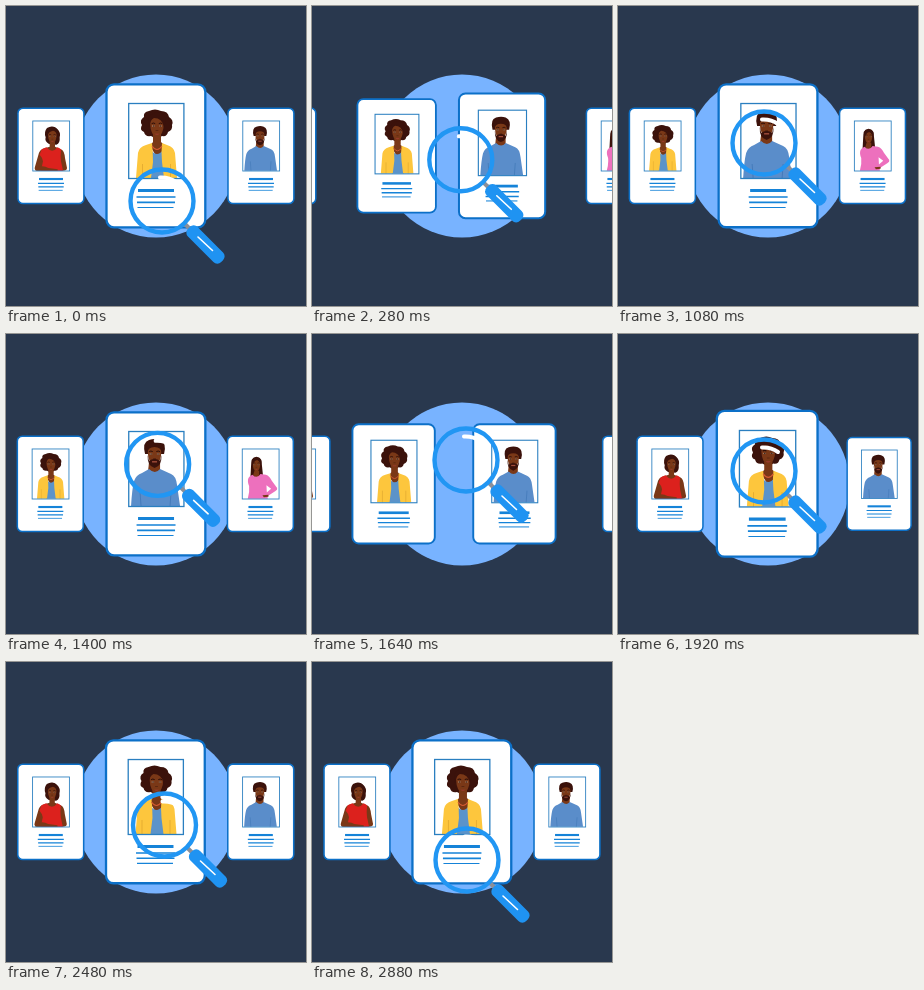
An HTML page for the animation above (2920 ms loop, 300 px wide and 300 px high).

```html
<!DOCTYPE html>
<html lang="en">
<head>
<meta charset="utf-8">
<title>Candidate search</title>
<style>
  html, body { margin: 0; width: 100%; height: 100%; overflow: hidden; background: #29384e; }
  svg { display: block; width: 100vw; height: 100vh; }
  .skin { fill: #7a3817; }
  .hair { fill: #3b120b; }
</style>
</head>
<body>
<svg viewBox="0 0 300 300">
  <defs>
    <g id="sheet">
      <rect x="-49.5" y="-71.7" width="98.8" height="143" rx="7.5" fill="#fff" stroke="#0c70c8" stroke-width="2.3"/>
      <g fill="none" stroke="#1583d8">
        <path d="M-18 34.5H18" stroke-width="3.2"/>
        <path d="M-19.5 41H19.5M-19 46.3H19" stroke-width="1.7"/>
        <path d="M-18.5 51.5H17.5" stroke-width="1.2"/>
      </g>
    </g>
    <rect id="frame" x="-27.3" y="-52.5" width="55.2" height="75" fill="none" stroke="#2a7fc0" stroke-width="1.3"/>
    <g id="face">
      <path class="skin" d="M-6.8-32Q-7-41 0-41Q7-41 6.8-32Q6.6-22 0-17Q-6.6-22-6.8-32Z"/>
      <path d="M-5.4-32.3Q-3.8-33.6-1.8-32.4M1.8-32.4Q3.8-33.6 5.4-32.3" fill="none" stroke="#2b0d08" stroke-width="1"/>
      <path d="M-4.8-30H-2.4M2.4-30H4.8" stroke="#c9b09a" stroke-width=".9"/>
      <path d="M-4-30h1.2M2.9-30h1.2" stroke="#1d0906" stroke-width="1.2"/>
      <path d="M-1.4-25.5H1.4" stroke="#54230f" stroke-width=".8"/>
      <path d="M-2.6-22.3Q0-20 2.6-22.3Z" fill="#a23a32"/>
    </g>
  </defs>

  <rect width="300" height="300" fill="#29384e"/>
  <circle cx="150" cy="150" r="81.5" fill="#78b3ff"/>

  <g id="red">
    <use href="#sheet"/>
    <path class="hair" d="M-6-42Q2-47 9-41Q15-36 13-28Q14-19 8-17L-3-18Q-10-22-8-28Q-11-36-6-42Z"/>
    <path class="skin" d="M-2-22H6V-14L15-10Q20-8 21 3L24 18Q24 22 18 22H-20Q-26 21-24 16L-18-5Q-17-9-12-11L-2-14Z"/>
    <path d="M-14-10L-7-13Q2-3 10-13L15-10Q14 0 15 8L18 22H-15L-12 8Q-13 2-17-2Z" fill="#dc211d"/>
    <path class="skin" d="M-24 18Q-12 13-4 18L10 20V22H-23Z"/>
    <use href="#face" transform="translate(2 -1) scale(.95)"/>
    <path class="hair" d="M-6-29Q-4-37 3-38Q8-37 10-30Q13-42 3-44Q-8-43-6-29Z"/>
    <use href="#frame"/>
  </g>

  <g id="yellow">
    <use href="#sheet"/>
    <path class="hair" d="M-7-45Q-1-48 5-45Q12-45 13-39Q18-36 16-31Q17-26 12-24Q11-19 6-20Q1-16-5-20Q-11-19-12-24Q-17-26-14-31Q-17-36-12-39Q-13-44-7-45Z"/>
    <path class="skin" d="M-3-22H5V-14L9-10L2 3L-6-10L-3-14Z"/>
    <path d="M-5-6Q1 2 7-6L9 22H-6Z" fill="#5b93c9"/>
    <path d="M-4-13L-10-11Q-17-9-18-3L-20 22H-5L-3 6Q-3-4-4-13Z" fill="#fdc63d"/>
    <path d="M6-13L11-11Q18-9 19-3L21 22H8L6 6Q5-4 6-13Z" fill="#fdc63d"/>
    <path d="M-13.5 8V22M14.5 8V22" stroke="#e0a82f" stroke-width=".8"/>
    <path d="M-4-10Q1-3 6-10" fill="none" stroke="#d65b32" stroke-width="1.1"/>
    <use href="#face" x="1"/>
    <path class="hair" d="M-7-29Q-6-36-2-38Q6-38 8-29Q13-42 2-44Q-11-42-7-29Z"/>
    <use href="#frame"/>
  </g>

  <g id="man">
    <use href="#sheet"/>
    <path class="skin" d="M-7-22H4V-13L-1-7L-8-13Z"/>
    <path d="M-7-15Q-1-9 4-15L15-10Q20-8 21 1L24 22H-25Q-24 5-22-3Q-20-9-14-11Z" fill="#5a8dca"/>
    <path d="M-16 8L-15 22M15 8L14 22" stroke="#4279b8" stroke-width=".9"/>
    <path class="hair" d="M-11-30Q-14-42-7-44Q-1-46 4-44Q11-41 8-30Z"/>
    <use href="#face" x="-1.5"/>
    <path class="hair" d="M-8.4-29L-7-23Q-4-25.5-1.5-25Q1-25.5 4-23L5.4-29Q6-18-1.5-16Q-9-18-8.4-29Z"/>
    <path d="M-4-22.2H1" stroke="#a14c3a" stroke-width="1.4"/>
    <path class="hair" d="M-9-31Q-8-37-1.5-37Q5-37 6-31Q10-43-1-44Q-13-43-9-31Z"/>
    <use href="#frame"/>
  </g>

  <g id="pink">
    <use href="#sheet"/>
    <path class="hair" d="M-6-40Q2-40 2-30L4-11Q-5-6-15-10L-14-29Q-13-40-6-40Z"/>
    <path class="skin" d="M-9-20H-2V-13L-5-8L-11-13Z"/>
    <path d="M-12-14Q-5-7 0-15L8-14Q14-12 17-5L25 6Q26 9 22 11L11 18L9 13L16 7L9 2Q9 12 11 22H-19Q-16 12-17 3Q-20-4-18-9Q-16-13-12-14Z" fill="#ed70bd"/>
    <path class="skin" d="M12 16L3 17L5 20L12 19Z"/>
    <use href="#face" transform="translate(-6 -2) scale(.86 .9)"/>
    <path class="hair" d="M-12-25Q-11-35-5-36Q0-34 0-25Q5-40-6-41Q-17-40-12-25Z"/>
    <use href="#frame"/>
  </g>

  <g id="lens" fill="none">
    <path d="M22 22L31 31" stroke="#8b8f99" stroke-width="4"/>
    <circle r="31.5" stroke="#2196f3" stroke-width="4.4"/>
    <path d="M-2-23.5Q7-24 14-19" stroke="#fff" stroke-width="4" stroke-linecap="round"/>
    <rect x="38" y="-6.8" width="47" height="13.6" rx="5.5" transform="rotate(45)" fill="#1f93f2"/>
    <path d="M36 36L50.5 49.5" stroke="#fff" stroke-width="1.6" stroke-linecap="round"/>
  </g>
</svg>

<script>
const LOOP = 2920, STEP = 40, SIDE = 0.667;
const byId = id => document.getElementById(id);
const lerp = (a, b, p) => a + (b - a) * p;

// Linear move from 0 to 1, followed by a decaying wobble.
function spring(t, start, end) {
  if (t <= start) return 0;
  if (t < end) return (t - start) / (end - start);
  const s = (t - end) / 1000;
  return 1 + 0.088 * Math.sin(6 * Math.PI * s) * Math.exp(-5 * s);
}

// Lens centre: time, x, y. The ends repeat neighbours across the loop.
const path = [
  [-40, 155, 198], [0, 156, 195], [600, 140, 120], [1080, 146, 137], [1640, 154, 126],
  [1920, 146, 137], [2480, 158.5, 163], [2880, 155, 198], [2920, 156, 195], [3520, 140, 120]
];

function slope(i, axis) {
  const rate = k => (path[k + 1][axis] - path[k][axis]) / (path[k + 1][0] - path[k][0]);
  const a = rate(i - 1), b = rate(i);
  return a * b > 0 ? 2 * a * b / (a + b) : 0;
}

function lensAt(t, axis) {
  let i = 1;
  while (t >= path[i + 1][0]) i++;
  const h = path[i + 1][0] - path[i][0], u = (t - path[i][0]) / h, v = 1 - u;
  return path[i][axis] * v * v * (1 + 2 * u) + path[i + 1][axis] * u * u * (3 - 2 * u)
    + h * u * v * (slope(i, axis) * v - slope(i + 1, axis) * u);
}

function place(id, x, scale) {
  byId(id).setAttribute("transform", `translate(${x} 150) scale(${scale})`);
}

function draw(t) {
  const back = t >= 1440;
  const shift = back ? 1 - spring(t, 1440, 1840) : spring(t, 33, 433);
  const yellowShift = back ? 1 - spring(t, 1485, 1923) : shift;
  place("red", lerp(45, -75, shift), SIDE);
  place("yellow", lerp(150, 44.3, yellowShift), lerp(1, SIDE, shift));
  place("man", lerp(255, 150, shift), lerp(SIDE, 1, shift));
  place("pink", lerp(393, 254.4, shift), SIDE);
  byId("lens").setAttribute("transform", `translate(${lensAt(t, 1)} ${lensAt(t, 2)})`);
}

const began = performance.now();
function tick() {
  const t = (performance.now() - began) % LOOP;
  draw(Math.floor(t / STEP) * STEP);
  requestAnimationFrame(tick);
}
tick();
</script>
</body>
</html>
```
